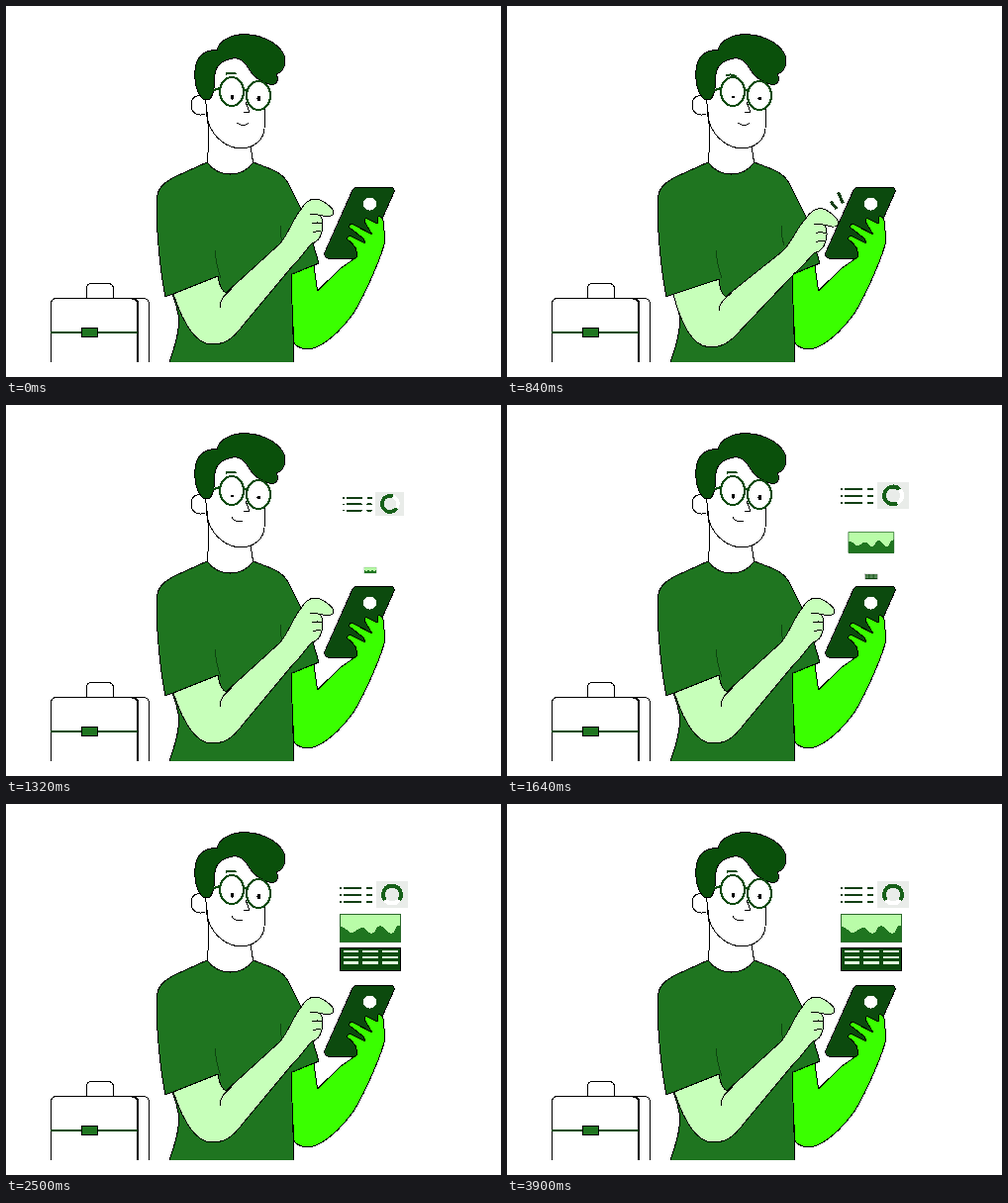
Animation of 500x375 px, one loop 4800 ms. Source, as an HTML page:

```html
<!DOCTYPE html>
<html lang="en">
<head>
<meta charset="utf-8">
<title>Phone dashboard</title>
<style>
  html, body { margin: 0; width: 100%; height: 100%; overflow: hidden; background: #fff; }
  svg { display: block; width: 100%; height: 100%; }
  .line { fill: none; }
  .hair { fill: #0a500b; }
  .shirt { fill: #1f7520; }
  .skin { fill: #c7ffba; }
  .bright { fill: #3aff00; }
  .phone { fill: #0c4a0e; }
  .white { fill: #fff; }
</style>
</head>
<body>
<svg viewBox="0 0 500 375" stroke="#000" stroke-width="1" stroke-linejoin="round" stroke-linecap="round" shape-rendering="crispEdges">
  <!-- briefcase -->
  <g class="line" stroke-linecap="butt">
    <path d="M81.500 296V286q0-5.500 5-5.500H103q5.500 0 5.500 5.500V296M45.500 360V301q0-5.500 6-5.500H138q6.500 0 6.500 6V360"/>
    <path d="M127 295.500q6 0 6 6V360" stroke-width="2"/>
    <path d="M45 330H133" stroke="#0c4a0e" stroke-width="2"/>
    <rect class="shirt" x="76.500" y="325.500" width="16" height="9" rx="1"/>
  </g>

  <!-- floating panels -->
  <g id="list" stroke="none">
    <rect x="374" y="78" width="32" height="27" fill="#e9ece9"/>
    <circle class="line" cx="390" cy="91.500" r="9" stroke="#fff" stroke-width="4"/>
    <path id="donut" class="line" stroke="#176019" stroke-width="4" stroke-linecap="butt" d="M395.500 84.400A9 9 0 1 0 395.500 98.600"/>
    <path class="line" stroke="#123f14" stroke-width="2" d="M338 85h.1M342 85H358M365 85h4M338 92h.1M342 92H358M365 92h4M338 99h.1M342 99H358M365 99h4"/>
  </g>
  <g id="chart" stroke="none">
    <rect x="337" y="111" width="62" height="29" fill="#b9fca8"/>
    <path class="shirt" d="M337 125C343 122 344 130 349 130S355 125 360 125S364 131 369 131S373 123 378 123S384 131 389 131S392 122 399 122V140H337Z"/>
    <rect class="line" x="337.500" y="111.500" width="61" height="28" stroke="#2b692c"/>
  </g>
  <g id="table">
    <rect class="phone" x="337.500" y="145.500" width="61" height="23" rx="1"/>
    <path stroke="#e4ffe0" stroke-width="2.2" stroke-linecap="butt" d="M341 149H356M360 149H376M380 149H396M341 155H356M360 155H376M380 155H396M341 160.500H356M360 160.500H376M380 160.500H396"/>
  </g>

  <!-- phone and the hand holding it -->
  <path class="phone" d="M355 183H389q4 1 3 5L365 249q-2 6-7 6H325q-4-1-3-6L350 186q2-3 5-3Z"/>
  <circle class="white" cx="367.500" cy="200" r="6.500" stroke="none"/>
  <path class="bright" d="M287 272L311 262L314.500 288L338 265L354 254C356 247 352 241 345 236Q344 232 349 233L363 240L361 235L347 224Q346 219 351 221L370 231L362 218Q362 213 367 216L375 220L376 213Q380 212 381 217L383 237C380 252 364 289 352 309C337 331 317 347 304 347C294 346 291 341 291 340Z"/>

  <!-- torso -->
  <path class="white" d="M202 106C206 125 205 140 203 159C215 174 238 174 250 159C249 154 247 149 248 140Z"/>
  <path class="shirt" d="M203 158C215 174 238 174 250 158L268 165C280 170 284 176 288 185L302 213L316 260L288 271L291 362H164.500C172 340 176 325 174 312C172 300 168 292 168 291L161 294C155 265 152 225 152 200C152 185 157 180 170 173Z"/>
  <rect class="white" x="160" y="360" width="140" height="4" stroke="none"/>
  <path class="line" stroke="#0d4410" d="M211 247C212 259 214 267 217 275M277 222C277 230 278 236 280 242M288 271L302 265"/>

  <!-- tapping arm -->
  <g id="arm">
    <path class="skin" d="M169 291L214 273C215 281 217 287 222 290L277 240C286 229 290 215 297 207C301 200 306 195 312 195C319 195 331 204 331 209C330 214 322 213 317 211C321 217 320 225 319 228C318 234 314 239 309 240C302 247 298 255 290 262L240 322C226 341 217 342 207 342C190 341 178 318 169 291Z"/>
    <path class="line" d="M216 305C216 296 222 291 228 286M307 211Q314 210 318 212M309 220Q315 218 319 220M310 229Q314 227 318 228"/>
  </g>
  <path id="spark" class="line" stroke="#173f18" stroke-width="3" stroke-linecap="butt" d="M327 197.500l6 7.500M334.500 188.500l5 11"/>

  <!-- head -->
  <path class="white" d="M201 91C193 89 187 92 187 100C187 108 194 112 201 109"/>
  <path class="white" d="M201 90L204 116C209 134 224 144 238 144C253 143 260 134 261 124L262 72L240 48L211 56Z"/>
  <path class="hair" transform="translate(0 .8)" d="M200 94C192 88 190 74 191 64C192 50 201 43 213 44C215 34 228 27 244 28C262 29 281 40 282 54C282 62 278 67 273 68C276 73 274 79 268 79C258 76 250 71 246 64C242 57 236 51 230 52C218 54 212 60 211 68C211 80 209 91 205 94Z"/>
  <path id="brow" class="line" stroke="#0c4a0e" stroke-width="2" d="M222.500 68.500Q227 66.500 232 68.500"/>
  <g class="line">
    <path d="M242.500 98L246 107.500H240"/>
    <path id="mouth"/>
    <g stroke="#0c4a0e" stroke-width="2">
      <ellipse class="white" cx="228" cy="86.500" rx="12" ry="14.500"/>
      <ellipse class="white" cx="255" cy="90.500" rx="12" ry="14.500"/>
      <path d="M240 86Q242 84 244 86M210 85L216 83"/>
    </g>
  </g>
  <ellipse class="eye" cx="228.500" cy="92" rx="2" stroke="none"/>
  <ellipse class="eye" cx="255.500" cy="93.500" rx="2" stroke="none"/>
</svg>
<script>
const LOOP = 4800;
const $ = id => document.getElementById(id);
const eyes = document.querySelectorAll('.eye');
const clamp = u => Math.max(0, Math.min(1, u));
const smooth = u => u * u * (3 - 2 * u);
const easeOut = u => 1 - (1 - u) ** 2;
const progress = (t, start, length) => clamp((t - start) / length);

// rises over the first pair of times and falls over the second
const pulse = (t, a, b, c, d) => smooth(progress(t, a, b - a)) - smooth(progress(t, c, d - c));

function grow(id, t, start, length) {
  const s = easeOut(progress(t, start, length));
  $(id).setAttribute('transform', `translate(368 178) scale(${s}) translate(-368 -178)`);
  $(id).style.display = s ? '' : 'none';
}

function draw(t) {
  const tap = pulse(t, 0, 380, 900, 1260) + pulse(t, 1660, 1860, 1920, 2160);
  $('arm').setAttribute('transform', `rotate(${3.7 * tap} 165 275)`);

  grow('list', t, 880, 640);
  grow('chart', t, 1230, 830);
  grow('table', t, 1575, 585);
  const spin = -20 + 110 * smooth(progress(t, 1200, 1300));
  $('donut').setAttribute('transform', `rotate(${spin} 390 91.5)`);
  $('spark').style.display = t >= 700 && t < 1000 ? '' : 'none';

  const blink = 0.6 * pulse(t, 680, 800, 1340, 1500)
    + pulse(t, 3020, 3140, 3180, 3320) + pulse(t, 3640, 3750, 3790, 3900);
  eyes.forEach(eye => eye.setAttribute('ry', 2.5 - 1.9 * blink));

  const frown = pulse(t, 120, 380, 900, 1260);
  const lift = pulse(t, 3020, 3140, 3180, 3320);
  $('brow').setAttribute('transform', `translate(${-frown} ${2 * frown - 1.5 * lift}) rotate(${3 * frown} 227 68)`);

  const smile = smooth(progress(t, 1040, 220));
  $('mouth').setAttribute('d', `M${234 - 6 * smile} ${118.5 - 5 * smile}q${5 - smile} ${4 + 2 * smile} 11 ${4 * smile}`);
}

function tick() {
  draw(performance.now() % LOOP);
  requestAnimationFrame(tick);
}
tick();
</script>
</body>
</html>
```
